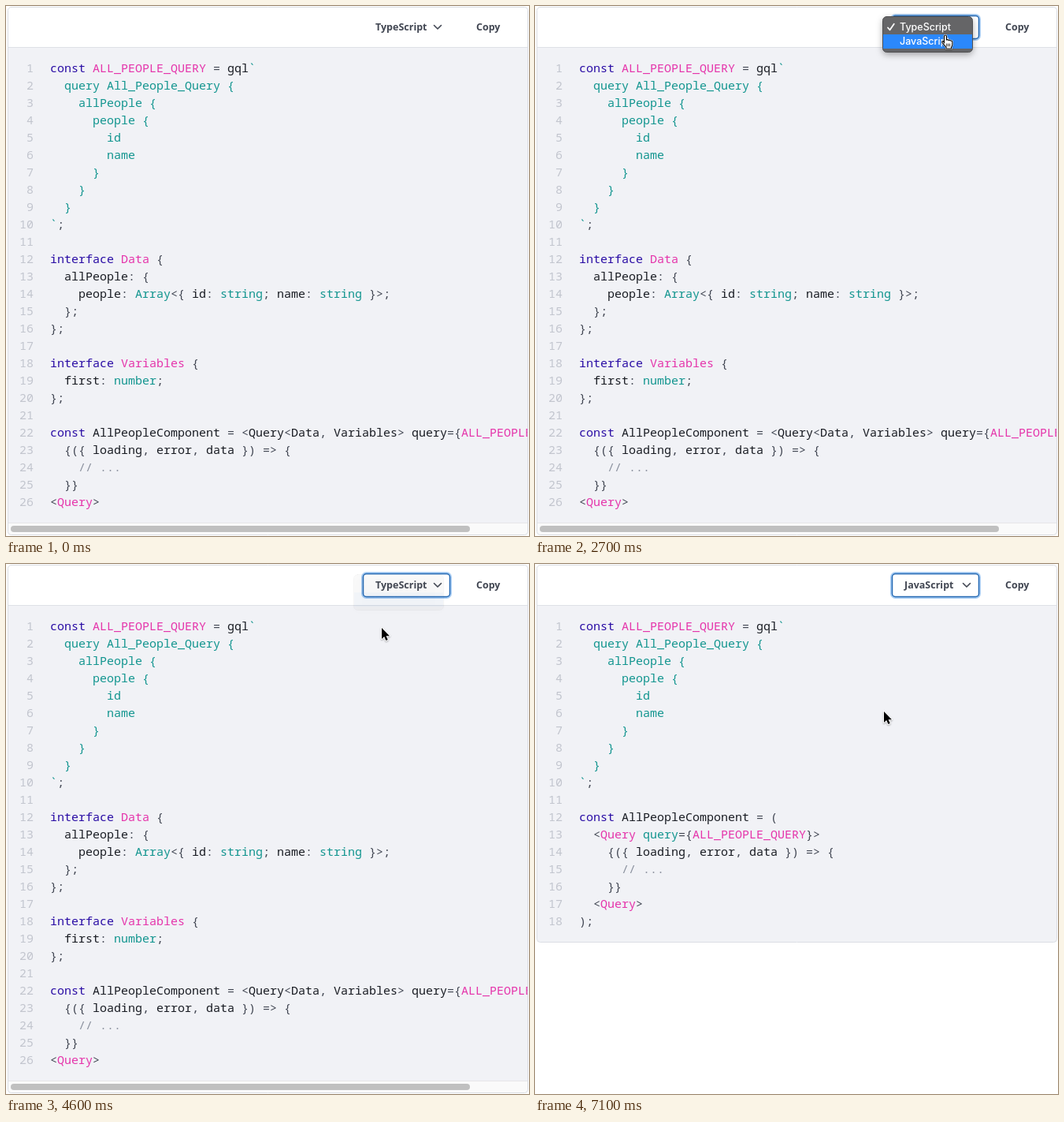
Recreate the animation shown at these times as an HTML page with a canvas. Size 664 px wide and 672 px high, loop 7.2 s.

```html
<!DOCTYPE html>
<html lang="en">
<head>
<meta charset="utf-8">
<title>Language switcher</title>
<style>
  html, body { margin: 0; width: 100%; height: 100%; overflow: hidden; background: #fff; }
  canvas { display: block; }
</style>
</head>
<body>
<canvas id="stage" width="664" height="672"></canvas>
<script>
const ctx = document.getElementById('stage').getContext('2d');
const LOOP = 7200, STEP = 100;
const CODE_FONT = '15px "Noto Sans Mono", monospace';
const UI_FONT = '600 12.5px "Noto Sans", sans-serif';
const MENU_FONT = '500 12.5px Inter, sans-serif';
const COLORS = { k: '#2a0da5', p: '#e535ab', t: '#12958f', c: '#8b919e' };

// [k…] keyword, [p…] pink, [t…] teal, [c…] comment
const QUERY = `const [pALL_PEOPLE_QUERY] = gql[t\`]
[t  query All_People_Query {]
[t    allPeople {]
[t      people {]
[t        id]
[t        name]
[t      }]
[t    }]
[t  }]
[t\`];

`;
const CODE = {
  TypeScript: QUERY + `interface [pData] {
  allPeople: {
    people: [tArray]<{ id: [tstring]; name: [tstring] }>;
  };
};

interface [pVariables] {
  first: [tnumber];
};

const AllPeopleComponent = <Query<Data, Variables> query={[pALL_PEOPLE_QUERY]}>
  {({ loading, error, data }) => {
    [c// ...]
  }}
</[pQuery]>`,
  JavaScript: QUERY + `const AllPeopleComponent = (
  <[pQuery] [tquery]={[pALL_PEOPLE_QUERY]}>
    {({ loading, error, data }) => {
      [c// ...]
    }}
  </[pQuery]>
);`
};

// Time, x, y of the pointer tip
const POINTER = [
  [1000, 658, 200], [1300, 600, 118], [1600, 540, 58], [1700, 527, 45], [1800, 521, 40],
  [2100, 521, 27], [2500, 521, 27], [2700, 521, 37], [3300, 521, 37], [4200, 498, 46],
  [4400, 497, 47], [4600, 477, 81], [5100, 452, 140], [5300, 446, 168], [5600, 443, 187]
];
const ARROW = new Path2D('M0 0V14L3.2 11 5.4 16 7.8 15 5.6 10.2H10z');
const HAND = new Path2D('M-1.5 10V1.5a1.5 1.5 0 0 1 3 0V6q1.2-1 2.6 .4q1.4-.8 2.5 .6q2-.4 2.2 1.5' +
  'v3.5q-.2 2-1.2 3.2v1.8H1v-1.8q-2-2-5-5.8q-.6-1.8 .9-1.8q.8 .2 1.6 1.6z');
const KNUCKLES = new Path2D('M1.7 11v3M3.7 11v3M5.7 11v3');
const CHEVRON = new Path2D('M543.5 24.5L548 29L552.5 24.5');
const CHECK = new Path2D('M448 27.5L450.6 30.3L455.8 22.8');

function box(x, y, w, h, r, fill, stroke, width = 1) {
  ctx.beginPath();
  ctx.roundRect(x, y, w, h, r);
  if (fill) { ctx.fillStyle = fill; ctx.fill(); }
  if (stroke) line(null, stroke, width);
}

function line(path, color, width) {
  ctx.strokeStyle = color;
  ctx.lineWidth = width;
  path ? ctx.stroke(path) : ctx.stroke();
}

function text(str, x, y, font, color) {
  ctx.font = font;
  ctx.fillStyle = color;
  ctx.fillText(str, x, y);
}

function drawCode(source) {
  source.split('\n').forEach((row, i) => {
    const y = 84 + i * 22;
    const number = String(i + 1);
    text(number, 35 - number.length * 9, y, CODE_FONT, '#c2c5ce');
    let x = 56;
    for (const [token] of row.matchAll(/\[.[^\]]*\]|const|interface|[{}()<>=;:,]+|\w+|\s+/g)) {
      const marked = token[0] === '[';
      const str = marked ? token.slice(2, -1) : token;
      const color = marked ? COLORS[token[1]]
        : /^(const|interface)$/.test(token) ? COLORS.k
        : /\w/.test(token) ? '#191c23' : '#424753';
      text(str, x, y, CODE_FONT, color);
      x += str.length * 9;
    }
  });
}

function drawPanel(language) {
  const wide = language === 'TypeScript';
  const height = wide ? 669 : 478;
  ctx.save();
  box(2.5, 1.5, 660, height, 4, '#f1f2f6');
  ctx.clip();
  ctx.fillStyle = '#fff';
  ctx.fillRect(2, 1, 661, 51);
  ctx.fillStyle = '#dee1e6';
  ctx.fillRect(2, 52, 661, 1);
  drawCode(CODE[language]);
  if (wide) {
    ctx.fillStyle = '#fafafa';
    ctx.fillRect(2, 655, 661, 16);
    ctx.fillStyle = '#e6e6e8';
    ctx.fillRect(2, 655, 661, 1);
    box(6, 659, 583, 8, 4, '#c0c0c0');
  }
  ctx.restore();
  box(2.5, 1.5, 660, height, 4, null, '#dbdee4');
}

function drawButton(language, hover, focus) {
  if (focus) {
    box(452.5, 11.5, 112, 31, 5, null, '#a9cdf3', 3);
    box(453.5, 12.5, 110, 29, 4, '#fff', '#2469b3', 1.5);
  } else if (hover) {
    box(453, 12, 111, 30, 4, '#f8f9fb');
  }
  text(language, 469, 31, UI_FONT, '#424753');
  line(CHEVRON, '#424753', 1.6);
  text('Copy', 597, 31, UI_FONT, '#424753');
}

function drawMenu(alpha, selectedRow) {
  ctx.save();
  ctx.globalAlpha = alpha;
  ctx.shadowColor = 'rgba(0,0,0,.35)';
  ctx.shadowBlur = 9;
  ctx.shadowOffsetY = 3;
  box(441.5, 13.5, 114, 45, 5, '#656567');
  ctx.shadowColor = 'transparent';
  box(441.5, 13.5, 114, 45, 5, null, '#505052');
  if (selectedRow >= 0) {
    ctx.fillStyle = '#2b88fb';
    ctx.fillRect(442, 18 + selectedRow * 18, 113, 18);
  }
  line(CHECK, '#fff', 1.8);
  text('TypeScript', 463, 31, MENU_FONT, '#fff');
  text('JavaScript', 463, 49, MENU_FONT, '#fff');
  ctx.restore();
}

function pointerAt(t) {
  const next = POINTER.findIndex(key => key[0] > t);
  if (next < 0) return POINTER.at(-1).slice(1);
  const [t0, x0, y0] = POINTER[next - 1], [t1, x1, y1] = POINTER[next];
  const f = (t - t0) / (t1 - t0);
  return [x0 + (x1 - x0) * f, y0 + (y1 - y0) * f];
}

function drawPointer(t) {
  if (t < POINTER[0][0]) return;
  const hand = t >= 1700 && t < 4500;
  const shape = hand ? HAND : ARROW;
  ctx.save();
  ctx.translate(...pointerAt(t));
  ctx.shadowColor = 'rgba(0,0,0,.3)';
  ctx.shadowBlur = 2;
  ctx.shadowOffsetY = 1;
  line(shape, '#fff', 2);
  ctx.shadowColor = 'transparent';
  ctx.fillStyle = hand ? '#fff' : '#000';
  ctx.fill(shape);
  if (hand) {
    line(shape, '#000', 1.1);
    line(KNUCKLES, '#000', 0.8);
  }
  ctx.restore();
}

function draw(now) {
  const t = Math.floor(now % LOOP / STEP) * STEP;
  const language = t < 4700 ? 'TypeScript' : 'JavaScript';
  ctx.fillStyle = '#fff';
  ctx.fillRect(0, 0, 664, 672);
  drawPanel(language);
  drawButton(language, t >= 1700, t >= 2500);
  if (t >= 2500 && t < 4700) {
    const alpha = t < 4500 ? 1 : t < 4600 ? 0.5 : 0.03;
    const row = t < 2600 ? 0 : t >= 4200 && t < 4400 ? -1 : 1;
    drawMenu(alpha, row);
  }
  drawPointer(t);
  requestAnimationFrame(draw);
}

ctx.lineCap = ctx.lineJoin = 'round';
requestAnimationFrame(draw);
</script>
</body>
</html>
```
